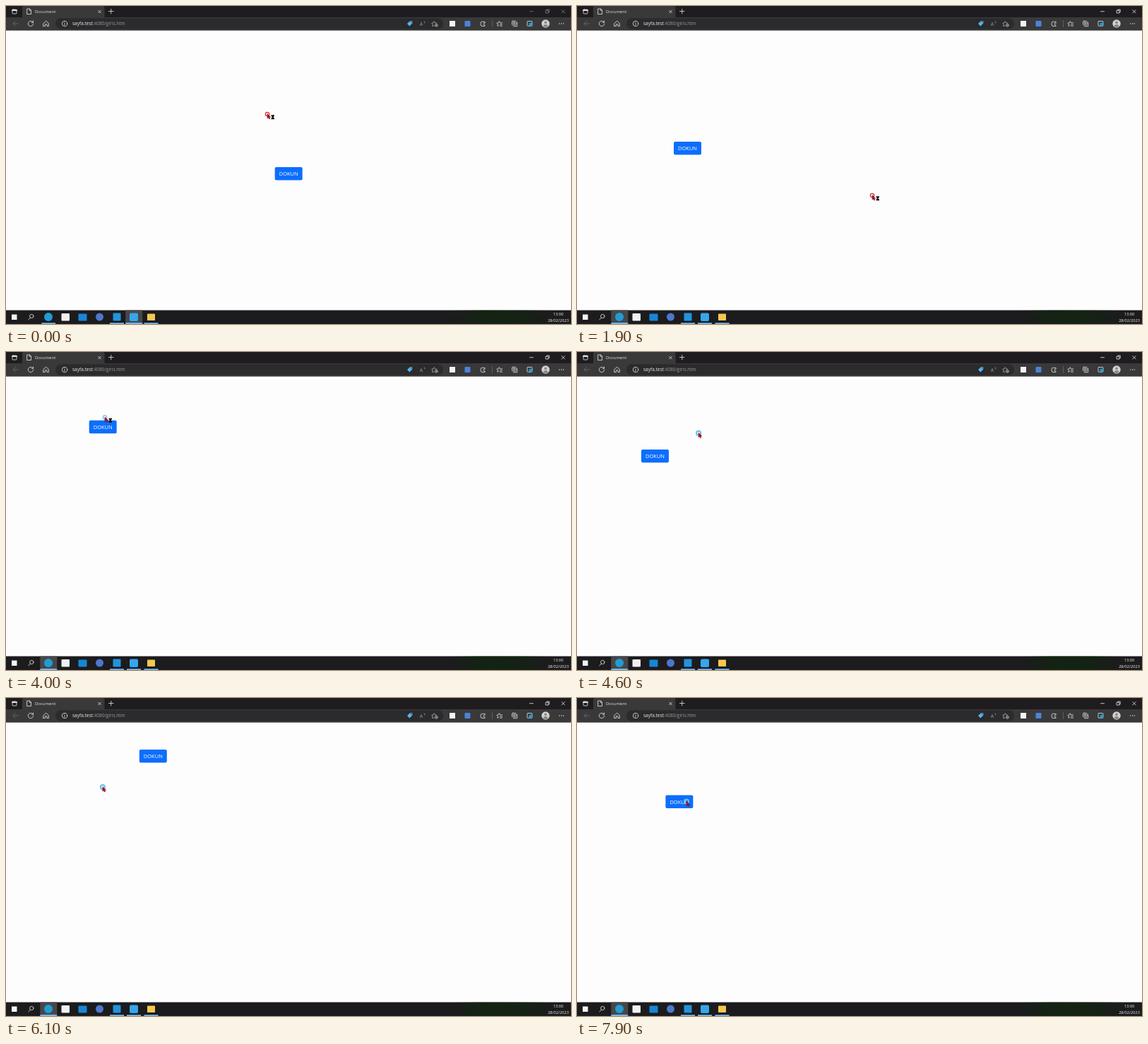
An HTML page that plays this animation: 800 by 450 pixels, repeating every 8 s.

```html
<!DOCTYPE html>
<html lang="tr">
<head>
<meta charset="utf-8">
<title>Document</title>
<style>
html, body { margin: 0; width: 100%; height: 100%; overflow: hidden; background: #fefdfe; }
svg { display: block; width: 800px; height: 450px; font-family: "Open Sans", "Noto Sans", sans-serif; }
.line { fill: none; stroke: #dcdcdc; stroke-width: .85; stroke-linecap: round; stroke-linejoin: round; }
.dim { stroke: #777; }
</style>
</head>
<body>
<svg viewBox="0 0 800 450">
  <defs>
    <linearGradient id="tint">
      <stop offset="0" stop-color="#10270f" stop-opacity="0"/>
      <stop offset=".3" stop-color="#10270f" stop-opacity=".7"/>
      <stop offset=".7" stop-color="#10270f" stop-opacity=".6"/>
      <stop offset="1" stop-color="#10270f" stop-opacity="0"/>
    </linearGradient>
  </defs>
  <rect width="800" height="450" fill="#fefdfe"/>

  <!-- browser frame -->
  <rect width="800" height="17" fill="#1e1c1f"/>
  <rect y="16" width="800" height="18.7" fill="#3a393a"/>
  <path d="M23 17V2.5Q23 0 25.500 0H137Q139.500 0 139.500 2.500V17Z" fill="#3a393a"/>
  <rect x="70" y="17.300" width="549" height="15.400" rx="7.700" fill="#2b2a2c"/>
  <g class="line">
    <rect x="9" y="5" width="6" height="6" rx="1"/>
    <path d="M9 6H15" stroke-width="2"/>
    <path d="M30 4H33.500L35.500 6V11.500H30ZM33.300 4V6.300H35.500"/>
    <path d="M130.700 6.200L134.300 9.800M134.300 6.200L130.700 9.800M145.500 7.500H152M148.750 4.300V10.800"/>
    <path class="dim" d="M17.500 25H10M13.300 21.700L10 25L13.300 28.300" style="stroke:#6b6b6b"/>
    <path d="M38 22.800A3.700 3.700 0 1 0 38.700 25M38.500 21V23.200H36.200"/>
    <path d="M53 24.500L56.700 21.200L60.400 24.500V28.500H58V25.800H55.400V28.500H53Z"/>
    <circle cx="83" cy="25" r="3.700"/><path d="M83 24.500V27M83 22.900V23"/>
    <path d="M592.200 21.700Q593.300 22.800 592.900 24" style="stroke:#999"/>
    <path d="M606 28L603.700 28.500L604.100 26L602.800 24.200L605 23.800L606.300 21.700L607.500 23.800L609.800 24.200" style="stroke:#aaa"/>
    <circle cx="609.300" cy="27.300" r="2" style="stroke:#aaa"/><path d="M608.300 27.300H610.300M609.300 26.300V28.300" stroke-width=".5"/>
    <path d="M678 22.800V22.300H673.500Q672 22.500 672.200 24.200V27Q672.500 28.500 674 28.500H678V27Q675.700 26.800 675.800 25.200Q676.200 23.700 678 24Z"/>
    <path d="M688.500 20.500V29.500" style="stroke:#666"/>
    <path d="M697.500 27.300L695.900 28.300L696.300 25.800L694.900 24.200L697.200 23.800L698.300 21.600L699.400 23.800H702.500M699.500 26H702.500M699.500 28.200H702.500"/>
    <rect x="716.500" y="21.300" width="5.500" height="5.500" rx="1"/><path d="M718.500 28.700H723.700V23.200M719.250 22.500V25.500M717.750 24H720.750"/>
    <rect x="738" y="21.500" width="7" height="6.800" rx="1"/>
    <path d="M783.700 25H783.800M786.500 25H786.600M789.300 25H789.400" stroke-width="1.300"/>
  </g>
  <circle cx="743" cy="26" r="2.600" fill="#2498d8"/>
  <path d="M568 25L572 21.200H575.300V24.500L571.300 28.500Z" fill="#58b4ee"/>
  <circle cx="573.700" cy="22.700" r=".7" fill="#2b2a2c"/>
  <text x="585.800" y="27.500" font-size="7" fill="#999">A</text>
  <rect x="628" y="21" width="8" height="8" fill="#f4f4f2"/>
  <rect x="649.500" y="21" width="8" height="8" rx="1" fill="#4c83da"/>
  <circle cx="764" cy="25" r="5.700" fill="#d5d2d0"/>
  <circle cx="764" cy="23.300" r="1.900" fill="#8b8785"/>
  <path d="M760.500 28.500Q761 25.900 764 25.900T767.500 28.500Q764 31.600 760.500 28.500Z" fill="#8b8785"/>
  <text x="41" y="9.800" font-size="6" fill="#e2e2e2">Document</text>
  <text x="94" y="27.300" font-size="6.500" fill="#eee">sayfa.test<tspan fill="#9b9b9b">:4080/giris.htm</tspan></text>
  <g id="controls" class="line">
    <path d="M741.500 7.700H746.500M764.500 6.200H768V10H764.500ZM765.700 6V5H769.200V8.700H768.200M786.700 5.500L791.200 10M791.200 5.500L786.700 10"/>
  </g>

  <!-- taskbar -->
  <rect y="430.500" width="800" height="19.500" fill="#1c1b1d"/>
  <rect x="630" y="430.500" width="140" height="19.500" fill="url(#tint)"/>
  <rect id="active" y="430.500" width="24" height="19.500" fill="#47474a"/>
  <g fill="#76b9ed">
    <rect x="50.500" y="448.300" width="19.500" height="1.700"/>
    <rect x="147" y="448.300" width="20" height="1.700"/>
    <rect x="171" y="448.300" width="20" height="1.700"/>
    <rect x="195.500" y="448.300" width="20" height="1.700"/>
    <rect id="activeLine" y="448.300" width="24" height="1.700"/>
  </g>
  <rect x="8" y="436.500" width="7.500" height="7.500" fill="#f4f4f4"/>
  <g class="line"><circle cx="36.300" cy="439" r="2.700"/><path d="M34.300 441.200L31.800 444"/></g>
  <circle cx="60" cy="440" r="6" fill="#229bd2"/>
  <rect x="78.500" y="435" width="11.500" height="10.500" rx="1" fill="#f1f1f1"/>
  <rect x="102.500" y="435.500" width="12" height="10" rx="1" fill="#1687d6"/>
  <circle cx="132.500" cy="440" r="5.500" fill="#4d77cd"/>
  <rect x="151.500" y="434.500" width="11" height="11" rx="1" fill="#2294dc"/>
  <rect x="175" y="434.500" width="12" height="11.500" rx="2" fill="#36a6ec"/>
  <rect x="200" y="435.500" width="11" height="9.500" rx=".7" fill="#f5c84f"/>
  <g font-size="5.600" fill="#f2f2f2" text-anchor="middle">
    <text x="782" y="438">13:00</text>
    <text x="782" y="446.800">28/02/2023</text>
  </g>

  <g id="button">
    <rect width="39" height="18.500" rx="2" fill="#0d6efd"/>
    <text x="19.500" y="12.200" font-size="7.500" fill="#fff" text-anchor="middle">DOKUN</text>
  </g>
  <g id="pointer">
    <circle id="ring" r="2.700" fill="none"/>
    <path d="M0 -.5V6L1.500 4.800L2.600 7L3.800 6.400L2.800 4.300H4.700Z" fill="#c90d1b" stroke="#4a0a10" stroke-width=".5"/>
    <path id="glass" d="M5.500 1.300H10V2.300Q9.700 3.500 8.400 4.300Q9.700 5 10 6.300V7.200H5.500V6.300Q5.800 5 7.100 4.300Q5.800 3.500 5.500 2.300Z" fill="#17080c"/>
  </g>
</svg>
<script>
const LOOP = 8000, STEP = 100, FOCUS = 1200;
const el = id => document.getElementById(id);

// [start time, x, y]: the button leaps away whenever it is touched
const leaps = [
  [0, 380.7, 228], [1700, 137, 192], [2600, 168.3, 117], [3300, 117.7, 96.8],
  [4100, 91, 138], [5800, 188.8, 73], [7200, 125.4, 137.6]
];
// [time, x, y] along the pointer's path
const path = [
  [0, 370, 153], [700, 382, 180], [1600, 403, 244], [1900, 418, 268],
  [2500, 174, 204], [3200, 215.5, 138.8], [3300, 206, 132], [4000, 140, 92.5],
  [4700, 174, 116], [5300, 184, 126.5], [5700, 128, 143], [6300, 140, 120],
  [6900, 156, 112.5], [7100, 191, 88], [7900, 155, 146.5], [8000, 155, 146.5]
];

const lastAt = (list, t) => list.findLastIndex(p => p[0] <= t);
const place = (node, x, y) => node.setAttribute("transform", `translate(${x} ${y})`);

function pointerAt(t) {
  const i = Math.min(lastAt(path, t), path.length - 2);
  const [t0, x0, y0] = path[i], [t1, x1, y1] = path[i + 1];
  const u = (t - t0) / (t1 - t0), k = u * u * (3 - 2 * u);
  return [x0 + (x1 - x0) * k, y0 + (y1 - y0) * k];
}

function draw(now) {
  const t = Math.floor(now % LOOP / STEP) * STEP;
  const focused = t >= FOCUS, busy = t >= 4600;
  const [, x, y] = leaps[lastAt(leaps, t)];
  place(el("button"), x, y);
  place(el("pointer"), ...pointerAt(t));

  el("ring").setAttribute("stroke", t < 1700 ? "#e5222b" : t < 2500 ? "#b83b32" : "#68bfeb");
  el("ring").setAttribute("stroke-width", busy ? 2.1 : 1.2);
  el("ring").setAttribute("r", busy ? 3 : 2.7);
  el("glass").setAttribute("visibility", busy ? "hidden" : "visible");

  el("controls").style.opacity = focused ? 1 : .45;
  for (const id of ["active", "activeLine"]) el(id).setAttribute("x", focused ? 48.3 : 169.2);
  requestAnimationFrame(draw);
}

const start = performance.now();
requestAnimationFrame(function first() { draw(0); });
draw = (render => now => render(Math.max(0, now - start)))(draw);
</script>
</body>
</html>
```
